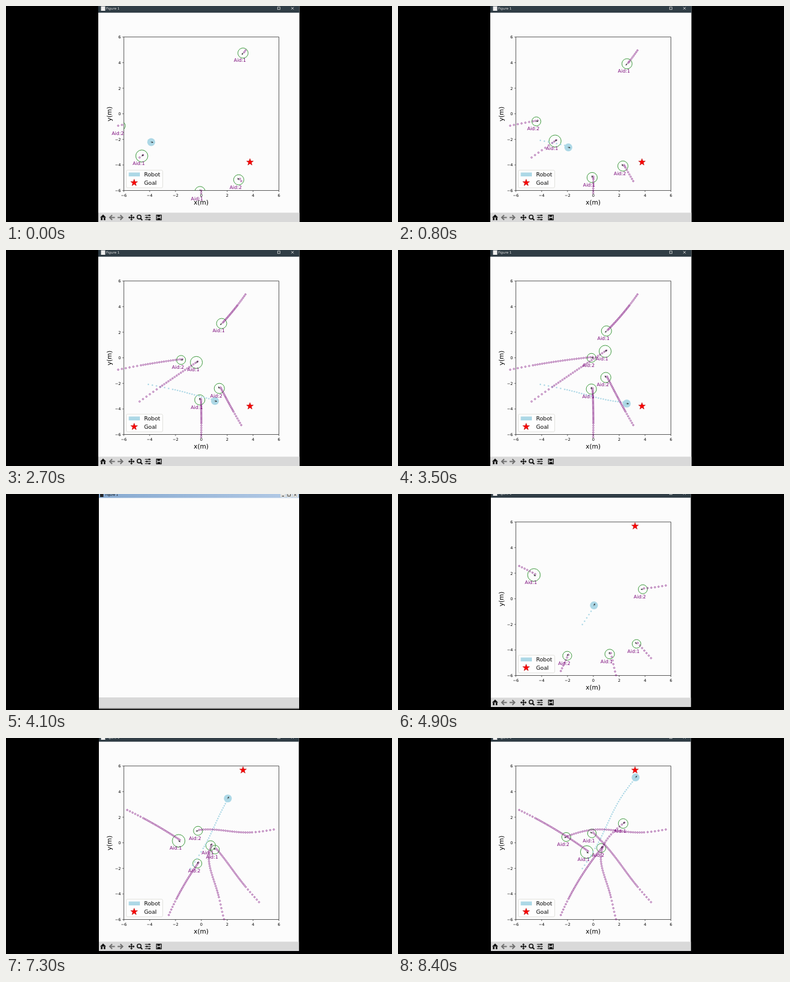
An HTML page with a canvas for the animation above (8.5 s loop, 640 by 360 pixels).

```html
<!DOCTYPE html>
<html lang="en">
<head>
<meta charset="utf-8">
<title>Robot navigation</title>
<style>
  html, body { margin: 0; width: 100%; height: 100%; overflow: hidden; background: #000; }
  canvas { display: block; width: 640px; height: 360px; }
</style>
</head>
<body>
<canvas id="stage" width="640" height="360"></canvas>
<script>
const ctx = document.getElementById('stage').getContext('2d');
const LOOP = 8500, TICK = 100, BLANK = 41, SECOND = 43;
const HELD = [1, 12, 13, 22]; // ticks on which the simulation stalls
const AXES = { x: 195.3, y: 51.7, w: 257.2, h: 255.9 };
const FONT = '"DejaVu Sans", sans-serif';
const LIGHT_BLUE = '#add8e6', PURPLE = '#7a087a', INK = '#111', TOOLBAR = '#d9d9d9';

// The first six steps cover more ground than the later ones.
const progress = step => step + 4 * Math.min(1, step / 6);

// A course between two points, bowed by `bend` and swinging by `sway` (fractions of its length).
const course = (steps, [x0, y0], [x1, y1], bend, sway = 0) => step => {
  const t = progress(step) / progress(steps), dx = x1 - x0, dy = y1 - y0;
  const side = 2 * t * (1 - t) * bend + Math.sin(2 * Math.PI * t) * sway;
  return [x0 + dx * t - dy * side, y0 + dy * t + dx * side];
};
const agent = (id, r, ...route) => ({ id, r, at: course(...route) });

const runs = [
  {
    shift: 0, left: 153, right: 486.5, first: -1, goal: [404.5, 260.3],
    robot: course(37, [234, 225.5], [400, 257], 0.04, -0.012),
    agents: [
      agent(1, 8.5, 37, [395, 75.5], [338, 142.5], -0.05),
      agent(2, 7.5, 37, [184, 201], [340, 178], -0.03),
      agent(1, 10, 37, [219.5, 254], [361, 157.5], -0.012),
      agent(2, 8.5, 37, [388, 293.3], [339, 201], -0.02),
      agent(1, 8.5, 37, [321.6, 313], [320, 220.5], 0.02)
    ]
  },
  {
    shift: -5, left: 154, right: 485.5, first: SECOND, goal: [393, 53.6],
    robot: course(41, [303.7, 219], [394, 65.7], -0.027, 0.017),
    agents: [
      agent(1, 10.5, 41, [199, 121.5], [313, 190], -0.045),
      agent(2, 7.5, 41, [442, 154], [279, 165], 0.045, -0.03),
      agent(2, 7.5, 41, [268, 296.5], [337, 183.3], -0.07),
      agent(1, 8, 41, [359.5, 303.5], [373.3, 142.5], -0.365, 0.055),
      agent(1, 7.2, 41, [417.5, 275], [321.5, 159], 0.012, -0.01)
    ]
  }
];

function rect(x, y, w, h, color) {
  ctx.fillStyle = color;
  ctx.fillRect(x, y, w, h);
}

function box(x, y, w, h, color, width) {
  ctx.strokeStyle = color;
  ctx.lineWidth = width;
  ctx.strokeRect(x, y, w, h);
}

function text(str, x, y, size, color = '#000', align = 'center') {
  ctx.font = `${size}px ${FONT}`;
  ctx.fillStyle = color;
  ctx.textAlign = align;
  ctx.fillText(str, x, y);
}

function line(color, width, ...points) {
  ctx.strokeStyle = color;
  ctx.lineWidth = width;
  ctx.beginPath();
  points.forEach(([x, y]) => ctx.lineTo(x, y));
  ctx.stroke();
}

function circle(x, y, r, color, width) {
  ctx.beginPath();
  ctx.arc(x, y, r, 0, 2 * Math.PI);
  ctx.fillStyle = ctx.strokeStyle = color;
  ctx.lineWidth = width || 1;
  width ? ctx.stroke() : ctx.fill();
}

function polygon(color, ...points) {
  ctx.fillStyle = color;
  ctx.beginPath();
  points.forEach(([x, y]) => ctx.lineTo(x, y));
  ctx.closePath();
  ctx.fill();
}

function cross(x, y, r, color) {
  line(color, 0.9, [x - r, y - r], [x + r, y + r]);
  line(color, 0.9, [x + r, y - r], [x - r, y + r]);
}

// Draws in a local frame moved to (x, y) and turned by angle.
function placed(x, y, angle, paint) {
  ctx.save();
  ctx.translate(x, y);
  ctx.rotate(angle);
  paint();
  ctx.restore();
}

function star(x, y) {
  polygon('#f00', ...Array.from({ length: 10 }, (_, i) => {
    const r = i % 2 ? 2.4 : 6, a = i * Math.PI / 5;
    return [x + r * Math.sin(a), y - r * Math.cos(a)];
  }));
  ctx.strokeStyle = '#a00000';
  ctx.lineWidth = 0.5;
  ctx.stroke();
}

function arrow(at, step) {
  const [x, y] = at(step), [px, py] = at(step - 0.2);
  placed(x, y, Math.atan2(y - py, x - px), () => {
    line('#333', 0.6, [-1, 0], [2, 0]);
    polygon('#222', [3.8, 0], [0.4, -1.5], [1.4, 0], [0.4, 1.5]);
  });
}

function trail(at, step, color, width) {
  for (let k = 0; k <= step; k++) {
    const [x, y] = at(k);
    circle(x + 2, y - 1.5, 1.25, color, width);
  }
}

function toolbar(left, right) {
  const y = 352.5;
  rect(left, 344.5, right - left, 15.5, TOOLBAR);
  polygon(INK, [156, y], [161, y - 5], [166, y]);
  rect(157.3, y, 2.7, 4.5, INK);
  rect(162, y, 2.7, 4.5, INK);
  for (const [x, dir] of [[176, -1], [189.5, 1]]) {
    line('#707070', 2, [x - 4.5 * dir, y], [x + 4 * dir, y]);
    line('#707070', 2, [x, y - 4], [x + 4 * dir, y], [x, y + 4]);
  }
  for (let i = 0; i < 4; i++) {
    placed(208, y, i * Math.PI / 2, () => {
      line(INK, 1.5, [0, 0], [3, 0]);
      polygon(INK, [5.3, 0], [2.8, -2.2], [2.8, 2.2]);
    });
  }
  circle(220.7, y - 0.8, 3.2, INK, 1.6);
  line(INK, 2, [223, y + 1.5], [226, y + 4.5]);
  for (let i = -1; i <= 1; i++) {
    line(INK, 1.1, [230.5, y + 3.5 * i], [240, y + 3.5 * i]);
    rect(i ? 236.5 : 232.5, y + 3.5 * i - 1.3, 2, 2.6, INK);
  }
  box(249.5, y - 4, 8, 8, INK, 1.3);
  rect(251, y - 4, 4.5, 3, INK);
  rect(251, y + 0.8, 5, 3, INK);
}

function windowFrame(left, right) {
  rect(left, 0, right - left, 360, '#fcfcfc');
  rect(left, 0, right - left, 11.2, '#303d45');
  rect(157.5, 0.5, 7, 7.5, '#eee');
  text('Figure 1', 166, 6.3, 5.6, '#ddd', 'left');
  box(450.3, 1.8, 4, 4, '#ddd', 0.8);
  cross(475, 3.8, 2, '#ddd');
  toolbar(left, right);
}

function axes() {
  const { x, y, w, h } = AXES, bottom = y + h;
  box(x, y, w, h, '#333', 0.8);
  for (let v = -6; v <= 6; v += 2) {
    const tx = x + (v + 6) / 12 * w, ty = bottom - (v + 6) / 12 * h;
    const label = String(v).replace('-', '\u2212');
    line('#333', 0.7, [tx, bottom], [tx, bottom + 2.4]);
    line('#333', 0.7, [x, ty], [x - 2.4, ty]);
    text(label, tx, bottom + 10.2, 6.55);
    text(label, x - 4.8, ty + 2.5, 6.55, '#000', 'right');
  }
  text('x(m)', 323.5, 330.5, 10.5);
  placed(175, 180, -Math.PI / 2, () => text('y(m)', 0, 0, 10.5));
}

function legend() {
  ctx.beginPath();
  ctx.roundRect(199.5, 273.7, 60.3, 29.3, 2);
  ctx.fillStyle = 'rgba(255,255,255,.8)';
  ctx.fill();
  ctx.strokeStyle = '#d6d6d0';
  ctx.lineWidth = 0.7;
  ctx.stroke();
  rect(203.5, 277.5, 18.5, 6.5, LIGHT_BLUE);
  star(212.5, 294.6);
  text('Robot', 229, 284.2, 9.2, '#000', 'left');
  text('Goal', 229, 297.8, 9.2, '#000', 'left');
}

function insideAxes(shift, paint) {
  ctx.save();
  ctx.beginPath();
  ctx.rect(AXES.x, AXES.y + shift, AXES.w, AXES.h);
  ctx.clip();
  paint();
  ctx.restore();
}

function drawRun({ shift, left, right, first, goal, robot, agents }, tick) {
  const step = tick - first - HELD.filter(h => h > first && h <= tick).length;
  placed(0, shift, 0, () => {
    windowFrame(left, right);
    axes();
  });
  insideAxes(shift, () => {
    circle(...robot(step), 6.6, LIGHT_BLUE);
    agents.forEach(a => circle(...a.at(step), a.r, '#2a8f2a', 0.9));
  });
  trail(robot, step, LIGHT_BLUE);
  agents.forEach(a => trail(a.at, step, PURPLE, 0.65));
  insideAxes(shift, () => [robot, ...agents.map(a => a.at)].forEach(at => arrow(at, step)));
  star(...goal);
  for (const { id, at } of agents) {
    const [x, y] = at(step);
    text('Aid:' + id, x - 5, y + 15, 7.9, PURPLE);
  }
  placed(0, shift, 0, legend);
}

function drawEmptyWindow() {
  const bar = ctx.createLinearGradient(154, 0, 486, 0);
  bar.addColorStop(0, '#86a9d0');
  bar.addColorStop(1, '#b4cbe6');
  rect(154, 0, 332, 360, '#fcfcfc');
  rect(154, 0, 332, 6.5, bar);
  rect(156, 0, 5.5, 5, '#222');
  text('Figure 1', 165, 3.2, 5.2, INK, 'left');
  for (let i = 0; i < 3; i++) rect(455 + 10 * i, 0, 9, 5.5, '#e4e4e0');
  line('#222', 1, [457.5, 3.5], [461, 3.5]);
  box(467, -1, 4.5, 4.5, '#222', 0.8);
  cross(479.5, 1.5, 2, '#222');
  rect(154, 339, 332, 17.5, TOOLBAR);
  rect(154, 356.5, 332, 1.5, '#999');
  rect(154, 358, 332, 2, '#222');
}

function draw(ms) {
  const tick = Math.floor(ms % LOOP / TICK);
  rect(0, 0, 640, 360, '#000');
  if (tick < BLANK) drawRun(runs[0], tick);
  else if (tick < SECOND) drawEmptyWindow();
  else {
    drawRun(runs[1], tick);
    rect(0, 355.5, 640, 4.5, '#000');
  }
}

const start = performance.now();
function loop() {
  draw(performance.now() - start);
  requestAnimationFrame(loop);
}
loop();
</script>
</body>
</html>
```
